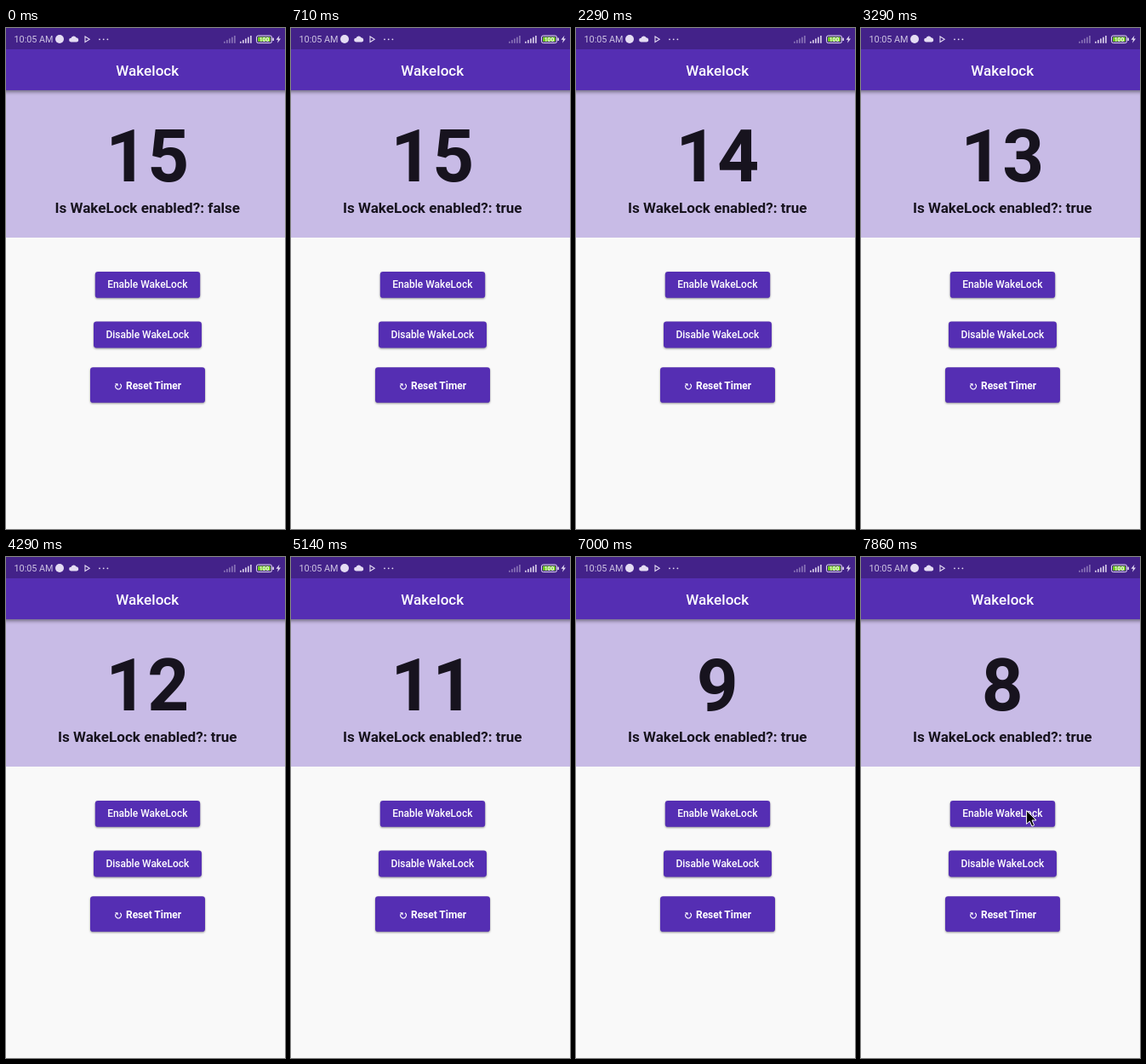
An HTML page that plays this animation: 328 px wide and 588 px high, repeating every 8 s.

```html
<!DOCTYPE html>
<html lang="en">
<head>
<meta charset="utf-8">
<title>Wakelock timer</title>
<style>
  html, body { margin: 0; width: 100%; height: 100%; overflow: hidden; background: #f9f9f9; }
  svg { display: block; width: 100%; height: 100%; font-family: Roboto, sans-serif; }
  .mid { text-anchor: middle; }
  .dark { fill: #17131e; font-weight: 700; }
  .label { fill: #fff; font-size: 11.96px; font-weight: 500; }
  .btn { fill: #552eb3; filter: drop-shadow(0 1.6px 1.2px rgba(0, 0, 0, .4)); }
  .bar { fill: #552eb3; filter: drop-shadow(0 2px 2px rgba(0, 0, 0, .45)); }
</style>
</head>
<body>
<svg viewBox="0 0 328 588">
  <rect width="328" height="588" fill="#f9f9f9"/>
  <rect y="73" width="328" height="173" fill="#c8bbe6"/>
  <rect class="bar" x="-6" y="20" width="340" height="53"/>
  <rect width="328" height="25" fill="#432289"/>

  <g id="status" fill="#e4dcf3">
    <text x="9.5" y="17.3" font-size="10.8" fill="#cfc5e4">10:05 AM</text>
    <circle cx="63" cy="13" r="5"/>
    <path d="M76.5 16.5a2.4 2.4 0 0 1 0-4.8a3.2 3.2 0 0 1 6-.4a2.6 2.6 0 0 1 .2 5.2z"/>
    <path d="M93 10l5.2 3.2l-5.2 3.2z" fill="none" stroke="#e4dcf3" stroke-width="1.1"/>
    <circle cx="110" cy="13.3" r=".9"/><circle cx="114.7" cy="13.3" r=".9"/><circle cx="119.4" cy="13.3" r=".9"/>
    <rect x="294.5" y="9" width="18" height="8.6" rx="2" fill="#432289" stroke="#e4dcf3"/>
    <rect x="296" y="10.5" width="15" height="5.6" rx=".8" fill="#6fc51f"/>
    <rect x="313.4" y="11.6" width="1.6" height="3.4"/>
    <text class="mid" x="303.5" y="15.8" font-size="6.8" font-weight="700" fill="#fff">100</text>
    <path d="M321.5 8.8l-4 5h2.5l-1 4l4-5.2h-2.5z"/>
  </g>

  <text class="mid" x="166.3" y="55.8" font-size="17.08" font-weight="500" fill="#fff">Wakelock</text>
  <text id="count" class="mid dark" x="166.3" y="180" font-size="85.4">15</text>
  <text id="state" class="mid dark" x="166.3" y="217" font-size="17.08"></text>

  <rect class="btn" x="104.8" y="286" width="123.4" height="30.8" rx="3.4"/>
  <text class="mid label" x="166.3" y="305.4">Enable WakeLock</text>
  <rect class="btn" x="103" y="344.6" width="127" height="30.8" rx="3.4"/>
  <text class="mid label" x="166.3" y="364">Disable WakeLock</text>
  <rect class="btn" x="99" y="398.2" width="135" height="41.6" rx="3.4"/>
  <path d="M129.4 418.6a3.3 3.3 0 1 0 4.6-.8" fill="none" stroke="#fff" stroke-width="1.1"/>
  <path d="M128 417.2h3.6v3.4z" fill="#fff"/>
  <text class="label" x="141" y="423.9" style="font-weight:700">Reset Timer</text>

  <path id="cursor" d="M194.6 297.6v15.8l3.7-3.4l2.6 6l2.7-1.2l-2.6-5.8h5z"
        fill="#000" stroke="#fff" stroke-width="1" stroke-linejoin="round"/>
</svg>
<script>
  const LOOP = 8000, ENABLED_AT = 570, FIRST_TICK = 1570, CURSOR_AT = 7570;
  const byId = id => document.getElementById(id);
  const count = byId('count'), state = byId('state'), cursor = byId('cursor');

  function addSignal(left, opacity) {
    for (let i = 0; i < 5; i++) {
      const bar = document.createElementNS('http://www.w3.org/2000/svg', 'rect');
      const height = 2 + i * 1.7;
      const box = { x: left + i * 3, y: 17.8 - height, width: 1.8, height, opacity };
      for (const key in box) bar.setAttribute(key, box[key]);
      byId('status').append(bar);
    }
  }
  addSignal(256, .4);
  addSignal(275, .85);

  function draw(now) {
    const t = now % LOOP;
    const ticks = Math.max(0, Math.floor((t - FIRST_TICK) / 1000) + 1);
    count.textContent = 15 - ticks;
    state.textContent = `Is WakeLock enabled?: ${t >= ENABLED_AT}`;
    cursor.style.visibility = t >= CURSOR_AT ? 'visible' : 'hidden';
  }

  const start = performance.now();
  function frame() {
    draw(performance.now() - start);
    requestAnimationFrame(frame);
  }
  frame();
</script>
</body>
</html>
```
